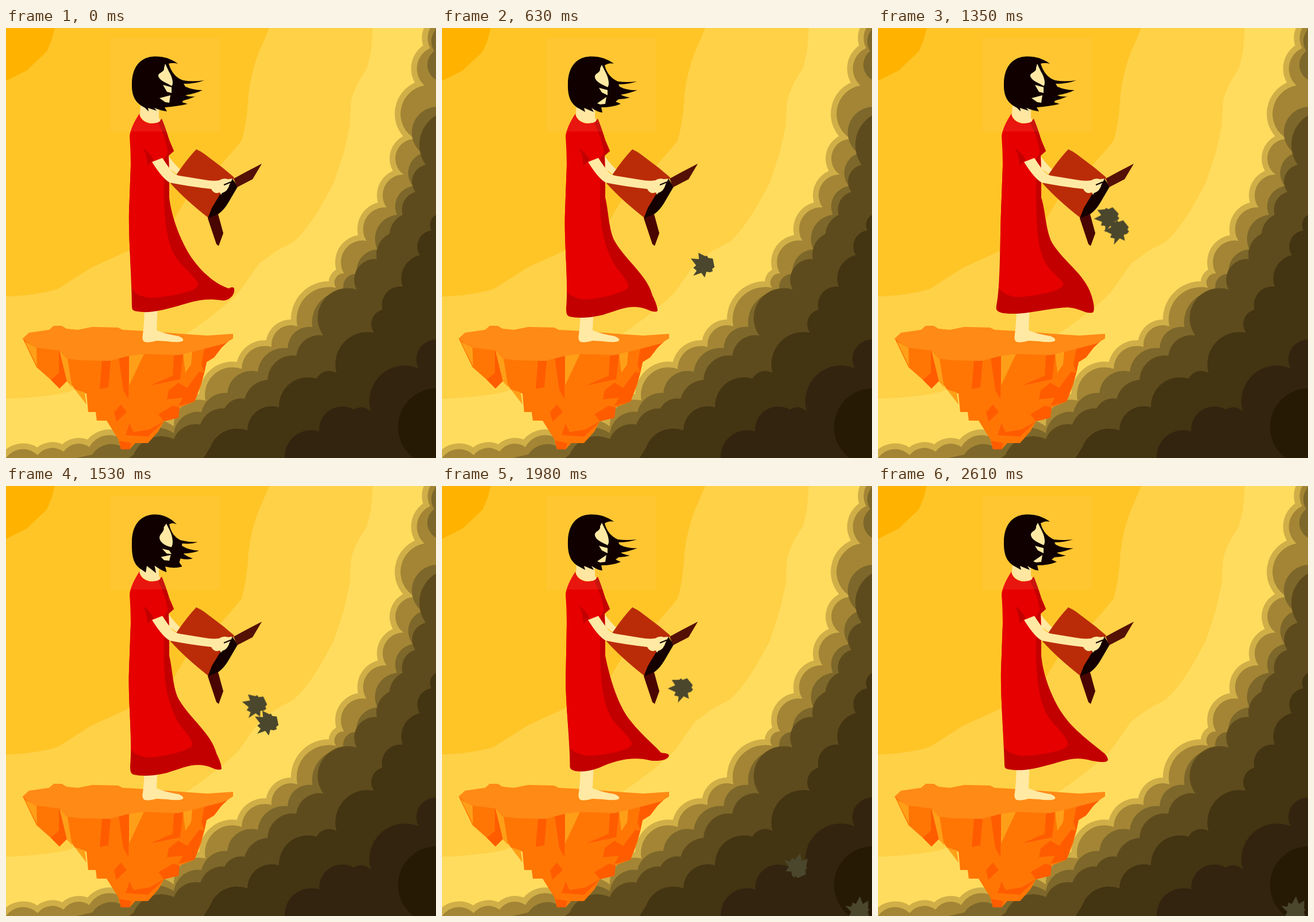
Write an HTML page without scripts that moves like this. It is 748x748 px and loops after 2.7 s.

```html
<!DOCTYPE html>
<html lang="en">
<head>
<meta charset="utf-8">
<title>Reader on a floating rock</title>
<style>
html, body { margin: 0; width: 100%; height: 100%; overflow: hidden; background: #ffdc5e; }
svg { display: block; width: 100vw; height: 100vh; }

.skin { fill: #ffe9a3; }
.red { fill: #e60000; }
.shade { fill: #c30000; }

/* Wind in the hair */
.hair, .face { animation: blow 1350ms infinite step-end; }
.hair {
  fill: #100000;
  --far: path("M299,62 C285,52 270,48 252,50 C228,54 219,75 219,97 C218,122 228,132 242,139 L248,145 L247,139 L262,144 L258,139 Q270,144 280,145 L276,138 Q300,136 316,132 L306,129 L309,126 Q318,124 329,119 Q318,120 312,117 Q330,114 342,108 Q325,108 312,102 L309,97 Q330,97 345,91 Q325,94 308,91 Q290,85 283,62 Q290,60 299,62Z");
  --mid: path("M299,62 C285,52 270,48 252,50 C228,54 219,75 219,97 C218,125 228,135 240,141 L249,146 L247,139 L264,146 L260,139 Q270,146 279,147 L277,138 Q297,138 311,132 L302,128 L307,124 Q317,124 327,121 Q316,119 311,116 Q328,113 340,108 Q322,109 309,102 L307,98 Q325,98 339,93 Q322,95 306,93 Q288,85 283,65 Q290,60 299,62Z");
  --near: path("M297,69 C285,54 270,48 252,50 C228,54 219,75 219,97 C218,130 220,140 232,148 L238,153 L244,140 L259,153 L256,138 Q268,146 279,149 L275,140 Q290,148 306,143 L303,138 L300,130 Q314,133 325,129 Q314,125 308,119 Q322,119 334,115 Q318,115 304,105 L306,101 Q320,104 330,101 Q316,100 304,95 Q288,88 285,68 Q290,66 297,69Z");
  --low: path("M295,72 C285,56 270,48 252,50 C228,54 219,75 219,97 C218,132 221,142 232,150 L237,155 L243,139 L258,157 L257,138 Q270,148 280,153 L277,142 Q290,151 302,148 L301,138 L300,128 Q313,134 323,131 Q314,127 306,119 Q320,121 332,117 Q316,115 303,106 L306,102 Q320,105 328,102 Q316,101 303,96 Q288,90 285,68 Q290,66 295,72Z");
}
.face {
  --far: path("M277,62 L283,75 C290,86 292,98 288,101 C282,96 268,93 265,84 C264,77 276,78 275,69Z M273,99 L288,103 L288,113 L280,111Z M267,122 L286,117 L284,130 L277,129Z");
  --mid: path("M278,64 L284,76 C290,87 292,99 288,103 C281,99 268,95 266,86 C265,78 276,79 275,70Z M273,104 L288,108 L288,117 L278,112Z M270,131 L286,120 L284,132 L275,133Z");
  --near: path("M280,66 L285,76 C291,89 291,104 287,110 C278,110 268,104 268,94 C269,85 276,81 274,72Z M270,113 L280,115 L288,119 L281,122Z M269,115 L287,119 L284,127 L275,125Z");
  --low: path("M280,67 L285,77 C291,90 291,104 287,110 C278,110 268,104 268,95 C269,86 276,82 274,73Z M270,114 L280,116 L288,120 L281,123Z M269,116 L287,120 L284,128 L275,125Z");
}
@keyframes blow {
  0% { d: var(--far); }
  6.66% { d: var(--mid); animation-timing-function: steps(2); }
  20%, 26.66% { d: var(--low); }
  33.33% { d: var(--near); animation-timing-function: steps(2); }
  46.66% { d: var(--mid); }
  53.33% { d: var(--mid); animation-timing-function: steps(2); }
  66.66% { d: var(--near); }
  73.33% { d: var(--low); }
  80% { d: var(--low); animation-timing-function: steps(2); }
  93.33% { d: var(--mid); }
  100% { d: var(--far); }
}

/* Skirt: full outline in shade, lit part on top */
.skirt, .lit { animation: sway 900ms infinite step-end; }
.skirt {
  --up: path("M217,240 L284,240 L284,295 C288,330 305,375 326,404 C345,430 370,448 388,453 C391,450 398,450 397,455 C398,465 388,474 377,474 C340,468 320,478 290,486 C265,493 245,496 228,493 C221,492 219,490 219,484 C219,440 213,370 214,320Z");
  --out: path("M217,240 L284,240 L284,295 C289,325 304,372 326,406 C345,433 368,454 383,460 C390,459 402,455 402,461 C402,470 390,476 375,475 C350,466 328,466 295,484 C270,497 248,498 237,496 C230,494 228,492 228,487 C226,440 214,370 216,320Z");
  --back: path("M217,240 L284,240 L284,295 C292,320 291,350 303,374 C325,410 365,430 374,475 C376,483 377,494 373,495 C362,498 350,487 330,486 C300,487 265,497 235,497 C225,497 218,497 211,494 C206,492 205,489 206,483 C213,450 212,370 214,320Z");
  --down: path("M217,240 L284,240 L284,295 C290,320 290,350 300,370 C320,405 357,430 366,465 C371,475 375,485 375,492 C372,495 365,493 360,491 C330,478 310,490 280,499 C255,505 235,505 222,502 C217,500 216,497 216,487 C220,440 212,370 214,320Z");
  --rise: path("M217,240 L284,240 L284,295 C287,330 304,374 325,402 C344,428 380,453 391,463 C397,467 400,473 400,477 C397,482 385,480 372,478 C340,468 320,480 290,487 C265,494 245,496 228,493 C221,492 220,490 220,484 C219,440 213,370 214,320Z");
}
.lit {
  --up: path("M217,240 L275,240 L275,300 C277,350 283,385 300,405 C320,428 338,440 333,450 C325,460 270,470 250,469 C235,468 222,462 219,452 C219,430 213,370 214,320Z");
  --out: path("M217,240 L275,240 L275,300 C277,350 283,385 300,408 C320,430 340,447 330,454 C315,465 270,471 255,469 C240,467 232,462 227,457 C224,430 214,370 216,320Z");
  --back: path("M217,240 L275,240 L275,300 C277,350 275,375 292,410 C305,430 325,440 322,448 C315,460 260,468 240,468 C225,466 215,460 210,452 C214,430 212,370 214,320Z");
  --down: path("M217,240 L275,240 L275,300 C275,350 283,380 300,412 C315,432 328,445 323,453 C310,463 265,473 245,472 C232,470 222,465 217,459 C219,430 212,370 214,320Z");
  --rise: path("M217,240 L275,240 L275,300 C277,350 283,385 300,407 C320,430 335,445 329,453 C318,463 270,470 250,469 C235,468 222,462 219,453 C219,430 213,370 214,320Z");
}
@keyframes sway {
  0% { d: var(--up); }
  10% { d: var(--out); animation-timing-function: steps(4); }
  50% { d: var(--back); animation-timing-function: steps(2); }
  70% { d: var(--down); animation-timing-function: steps(2); }
  90% { d: var(--rise); }
  100% { d: var(--up); }
}

/* Spiky scraps fall out of the book; --k is the start in 90 ms ticks */
.scrap {
  fill: #4b472d;
  animation: fall 2700ms infinite step-end;
  animation-delay: calc(var(--k) * 90ms - 2700ms);
}
@keyframes fall {
  0% { transform: translate(372px, 297px) rotate(-30deg) scale(.2); }
  3.33% { transform: translate(380px, 307px) rotate(-30deg) scale(.6); }
  6.66% { transform: translate(388px, 317px) rotate(-30deg); }
  9.99% { transform: translate(400px, 331px) rotate(-32deg); }
  13.33% { transform: translate(417px, 353px) rotate(-28deg); }
  16.66% { transform: translate(434px, 382px) rotate(-14deg); }
  19.99% { transform: translate(454px, 413px); }
  23.33% { transform: translate(470px, 456px) rotate(4deg); }
  26.66% { transform: translate(498px, 505px) rotate(8deg); }
  29.99% { transform: translate(544px, 567px) rotate(-30deg); }
  33.33% { transform: translate(617px, 662px) rotate(75deg); }
  36.66% { transform: translate(725px, 738px) rotate(65deg); }
  39.99%, 100% { transform: scale(0); }
}
</style>
</head>
<body>
<svg viewBox="0 0 748 748">
  <defs>
    <path id="scrap" d="M-8,-22 L4,-16 L7,-17 L9,-13 L17,-12 L19,-2 L20,3 L16,6 L17,10 L12,12 L6,11 L3,21 L-3,13 L-17,18 L-11,9 L-17,4 L-12,0 L-21,-12 L-7,-11Z"/>
  </defs>

  <g id="sky">
    <path fill="#ffdc5e" d="M0,0H748V748H0Z"/>
    <path fill="#ffd147" d="M0,0H638L635,40L628,70Q604,105 600,130L598,170L588,215L570,270L545,315Q520,355 500,372L470,388L440,410L405,460Q375,490 320,528L110,633Q70,642 0,645Z"/>
    <path fill="#ffc527" d="M0,0H458L440,42Q426,78 422,115Q419,165 410,196L390,220Q350,265 312,300L285,345L214,387L150,416L90,454Q50,466 0,467Z"/>
    <path fill="#ffb300" d="M0,0H85L79,22L71,41L36,74L20,82L0,92Z"/>
  </g>

  <g id="clouds">
    <path fill="#a38535" stroke="#d0af48" stroke-width="20" stroke-linejoin="round" paint-order="stroke" d="M770,-20L738,0A36 36 0 0 0 738,35A39 39 0 0 0 728,100A50 50 0 0 0 712,193A34 34 0 0 0 692,255A36 36 0 0 0 662,312A38 38 0 0 0 627,370A38 38 0 0 0 588,427A16 16 0 0 0 574,452A56 56 0 0 0 507,519A34 34 0 0 0 462,555A40 40 0 0 0 410,593A48 48 0 0 0 347,648A44 44 0 0 0 292,693A56 56 0 0 0 205,717A40 40 0 0 0 145,729A32 32 0 0 0 100,737A32 32 0 0 0 55,743A36 36 0 0 0 0,748L-20,770H770Z"/>
    <path fill="#7d672a" d="M748,0L744,8A30 30 0 0 0 745,40A30 30 0 0 0 748,90ZM770,130L748,137A45 45 0 0 0 724,218A36 36 0 0 0 708,275A36 36 0 0 0 680,325A42 42 0 0 0 646,385A38 38 0 0 0 610,428A22 22 0 0 0 588,458A54 54 0 0 0 533,520A38 38 0 0 0 490,557A46 46 0 0 0 438,598A42 42 0 0 0 385,635A42 42 0 0 0 340,668A42 42 0 0 0 292,705A58 58 0 0 0 205,730A40 40 0 0 0 150,742L90,755L60,770H770Z"/>
    <path fill="#5e4b1d" d="M770,145L748,152A60 60 0 0 0 730,238A30 30 0 0 0 712,285A32 32 0 0 0 690,325A40 40 0 0 0 667,358A40 40 0 0 0 645,402A36 36 0 0 0 610,455A52 52 0 0 0 552,535A40 40 0 0 0 505,570A44 44 0 0 0 455,612A44 44 0 0 0 415,645A32 32 0 0 0 380,662A40 40 0 0 0 338,690A40 40 0 0 0 292,715A52 52 0 0 0 222,742L185,770H770Z"/>
    <path fill="#433412" d="M770,320L748,325A20 20 0 0 0 740,352A28 28 0 0 0 720,395A42 42 0 0 0 690,450A32 32 0 0 0 655,490A26 26 0 0 0 640,530A56 56 0 0 0 575,600A25 25 0 0 0 540,610A50 50 0 0 0 475,660A42 42 0 0 0 420,700A50 50 0 0 0 355,730L330,770H770Z"/>
    <path fill="#32240f" d="M770,535L748,542A34 34 0 0 0 718,592A62 62 0 0 0 635,668A22 22 0 0 0 605,664A40 40 0 0 0 545,702A46 46 0 0 0 485,750V770H770Z"/>
    <circle fill="#261a05" cx="749" cy="694" r="67"/>
  </g>

  <g id="rock">
    <path fill="#ff7605" d="M29,540L53,590L78,612L93,627L108,612L120,629L140,636L143,668H156L158,683H175L195,715L200,733H215L225,722H247L265,702L275,684L300,678L302,660L328,650L340,620L349,581L362,573L375,556L395,537Z"/>
    <path fill="#ff5c00" d="M92,561L103,575L108,600L107,613L93,627L78,612L92,600ZM167,579H182L178,625L163,628ZM196,573L215,569L213,645L204,630ZM292,570L308,567L303,611L250,622L290,605ZM345,558L395,537L375,556L362,573L349,581L345,600L340,585ZM283,630L300,617L315,626L336,598L345,600L328,650L300,657L308,643L280,646ZM265,672L290,657L302,660L300,678L275,684ZM200,655L210,668L192,685L188,668ZM215,688L222,703L250,698L275,684L247,711L208,708ZM197,718L218,722L215,733H200Z"/>
    <path fill="#ff9f18" d="M33,546L53,556L54,588ZM93,561L107,575L115,625L106,615ZM214,569L240,567L214,622ZM308,567L324,562L322,585L312,600ZM120,629L137,634L140,655Z"/>
    <path fill="#ff8a15" d="M29,540L40,530L75,525L83,518H97L105,523L125,525L150,520L195,521L203,525L240,527L320,533L350,535L395,532V540L380,549L330,562L300,569L240,567L215,570L180,579L130,578L105,575L93,561L53,556L40,549Z"/>
  </g>

  <g id="girl">
    <path class="skin" d="M241,480H264L262,526Q280,533 300,536Q310,540 308,544Q302,548 280,545L262,544Q248,548 241,546Q236,543 238,533Q241,510 241,480Z"/>
    <path class="skirt shade"/>
    <path class="lit red"/>
    <path class="skin" d="M282,222Q294,238 306,249L298,255L283,244Z"/>
    <path class="red" d="M232,149Q234,162 250,166Q262,167 271,158Q276,170 284,195L292,214L283,222L284,250H217Q217,215 215,188Q217,172 232,149Z"/>
    <path class="shade" d="M265,166L271,158Q277,172 284,195L292,214L283,222L284,300H275V228L282,216Q276,185 265,166ZM238,208Q247,215 254,224L257,230L246,239Q246,222 238,208Z"/>
    <path class="skin" d="M234,135H266L266,157Q272,162 262,165Q240,168 233,152Z"/>
    <path fill="#ffc890" opacity=".1" d="M182,18H372V180H182Z"/>
    <path class="hair"/>
    <path class="face skin"/>
  </g>

  <g id="book">
    <path fill="#ba2c08" d="M331,211Q338,214 345,219L378,244L397,260L353,331Q312,299 286,270L300,250Q315,228 331,211Z"/>
    <path fill="#150000" d="M393,261L403,276L386,305Q372,328 351,331L358,313L375,285Z"/>
    <path fill="#551005" d="M396,262L420,249L445,236L429,263L402,277Z"/>
    <path fill="#4a0500" d="M351,331L369,324L378,357L370,379L366,376Z"/>
  </g>

  <use href="#scrap" class="scrap" style="--k:1"/>
  <use href="#scrap" class="scrap" style="--k:11"/>
  <use href="#scrap" class="scrap" style="--k:12"/>
  <use href="#scrap" class="scrap" style="--k:18"/>

  <path class="skin" d="M254,233L272,226Q279,237 286,246Q292,255 302,257L345,264Q360,267 371,265Q378,260 386,263L394,262L389,272Q386,284 376,287L374,290L372,286Q362,290 357,280Q320,276 285,269Q272,262 254,233Z"/>
  <path fill="none" stroke="#150000" stroke-width="2" d="M379,273L391,268"/>
</svg>
</body>
</html>
```
